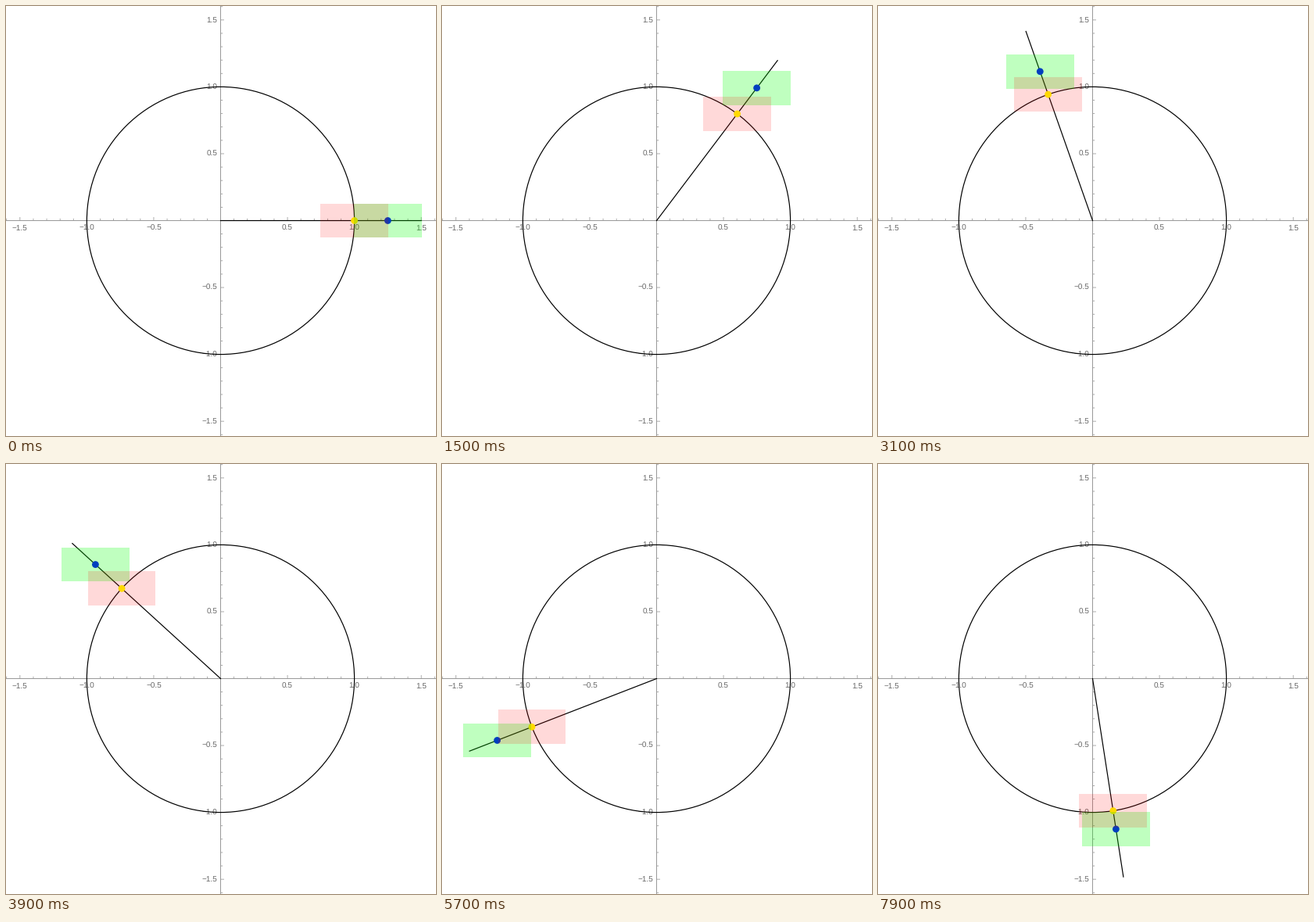
Animation, 550 px wide and 550 px high, one loop 8 s. Source, as a matplotlib script:

```python
import numpy as np
import matplotlib.pyplot as plt
from matplotlib.animation import FuncAnimation
from matplotlib.patches import Circle, Rectangle

SIZE, DPI = 550, 100
FRAMES, INTERVAL = 80, 100
STEPS_PER_TURN = 102
CENTER = np.array([274.5, 274.5])
UNIT = 171.1
HALF = np.array([0.25, 0.125])  # half width and height of the boxes
RAY = 1.5
GRAY, LABEL = "#999999", "#666666"
PX = 72 / DPI

plt.rcParams["font.family"] = "Liberation Sans"
plt.rcParams["text.hinting"] = "none"

fig = plt.figure(figsize=(SIZE / DPI, SIZE / DPI), dpi=DPI, facecolor="white")
ax = fig.add_axes([0, 0, 1, 1])
ax.set_xlim(0, SIZE)
ax.set_ylim(SIZE, 0)
ax.axis("off")


def to_px(p):
    """Plane coordinates to stage pixels."""
    return CENTER + UNIT * np.array([p[0], -p[1]])


def segment(x, y, color=GRAY, width=1.0, z=1, cap="butt"):
    return ax.plot(x, y, color=color, lw=width * PX, zorder=z,
                   solid_capstyle=cap, snap=False)[0]


def label(x, y, value, align):
    ax.text(x, y, f"{value:.1f}".replace("-", "\u2212"), size=10 * PX,
            color=LABEL, ha=align, va="baseline", zorder=1)


def draw_axes():
    cx, cy = CENTER
    segment([0, SIZE], [cy, cy])
    segment([cx, cx], [0, SIZE])
    for k in range(-16, 17):
        if k == 0:
            continue
        major = k % 5 == 0
        size = 4.5 if major else 2.7
        x, y = to_px((k / 10, k / 10))
        segment([x, x], [cy, cy - size], width=0.8)
        segment([cx, cx + size], [y, y], width=0.8)
        if major:
            label(x, 286.5, k / 10, "center")
            label(270.5, y + 3.2, k / 10, "right")


def dot(color):
    return ax.add_patch(Circle((0, 0), 4.4, fc=color, ec="none", zorder=4))


def box(color, alpha, z):
    return ax.add_patch(Rectangle((0, 0), 0, 0, fc=color, ec="none",
                                  alpha=alpha, zorder=z))


def place_box(rect, pos):
    """Center the box on pos, grown outward to whole pixels."""
    low = np.floor(pos - HALF * UNIT)
    high = np.ceil(pos + HALF * UNIT)
    rect.set_bounds(*low, *(high - low))


def touch_radius(u):
    """Distance along u at which a box just touches the unit circle."""
    a = np.abs(u)
    for i in (0, 1):
        r = (1 + HALF[i]) / max(a[i], 1e-9)
        if r * a[1 - i] <= HALF[1 - i]:
            return r
    d = a @ HALF
    return d + np.sqrt(d * d - HALF @ HALF + 1)


draw_axes()
ax.add_patch(Circle(CENTER, UNIT, fill=False, ec="black", lw=1.2 * PX, zorder=2))
ray = segment([], [], "black", 1.2, 3, "projecting")
inner_dot, outer_dot = dot("#ffff00"), dot("#0000ff")
outer_box = box("#00ff00", 0.25, 5)
inner_box = box("#ff0000", 0.15, 6)


def update(frame):
    angle = 2 * np.pi * frame / STEPS_PER_TURN
    u = np.array([np.cos(angle), np.sin(angle)])
    ray.set_data(*zip(CENTER, to_px(RAY * u)))
    for r, point, rect in ((1, inner_dot, inner_box),
                           (touch_radius(u), outer_dot, outer_box)):
        pos = to_px(r * u)
        point.center = pos
        place_box(rect, pos)
    return ray, inner_dot, outer_dot, outer_box, inner_box


anim = FuncAnimation(fig, update, frames=FRAMES, interval=INTERVAL,
                     repeat=True, repeat_delay=0)
plt.show()
```
